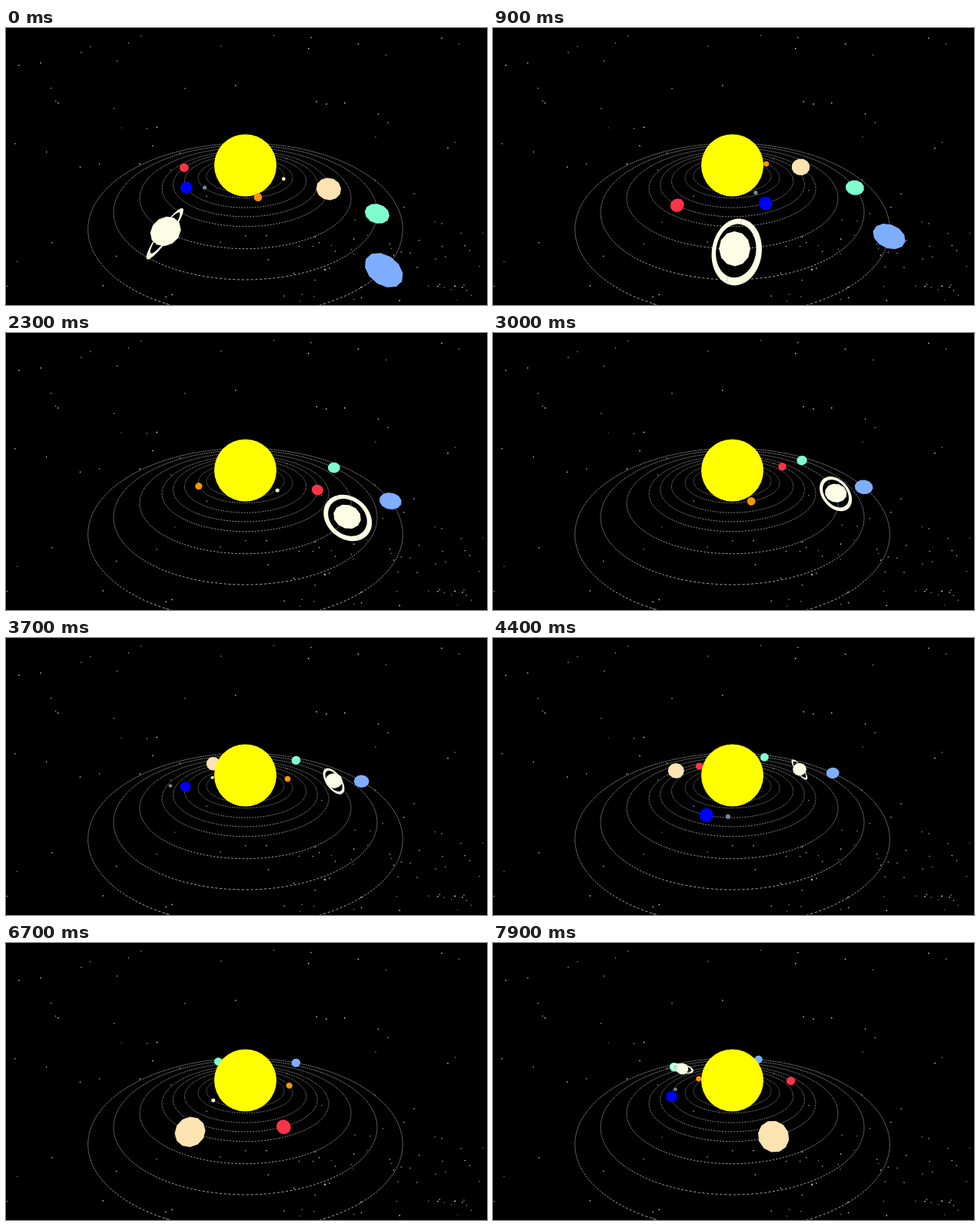
Animation, 626 px wide and 361 px high, one loop 8 s. Source, as an HTML page with a canvas:

```html
<!DOCTYPE html>
<html lang="en">
<head>
<meta charset="utf-8">
<title>Planets</title>
<style>
html, body { margin: 0; width: 100%; height: 100%; overflow: hidden; background: #000; }
canvas { display: block; width: 626px; height: 361px; }
</style>
</head>
<body>
<canvas id="stage" width="626" height="361"></canvas>
<script>
const W = 626, H = 361, LOOP = 8000, STEP = 100, TAU = Math.PI * 2;
const ctx = document.getElementById('stage').getContext('2d');
const rad = deg => deg * Math.PI / 180;

// Camera: focal length, ground scale, pitch terms, screen centre, eye position
const FOCAL = 217.6, SCALE = 235, PITCH = 88.8, DROP = 8.2, TILT = 0.408;
const CX = 311.5, CY = 180.5;
const EYE = [0, 0.382, 0.844];

// Scene axes: x right, y up, z towards the viewer
function project([x, y, z]) {
  const depth = 1 - z - y * TILT;
  return {
    x: CX + SCALE * x / depth,
    y: CY + (PITCH * z + DROP - FOCAL * y) / depth,
    depth
  };
}

const onGround = (r, deg) => [r * Math.cos(rad(deg)), 0, r * Math.sin(rad(deg))];
const add = (a, b) => a.map((v, i) => v + b[i]);
const mul = (a, k) => a.map(v => v * k);
const dot = (a, b) => a[0] * b[0] + a[1] * b[1] + a[2] * b[2];
const unit = a => mul(a, 1 / Math.hypot(...a));
const cross = (a, b) => [
  a[1] * b[2] - a[2] * b[1],
  a[2] * b[0] - a[0] * b[2],
  a[0] * b[1] - a[1] * b[0]
];

// size is in px at unit depth, start in degrees, speed in degrees per second
const planets = {
  mercury: { orbit: 0.210, size: 2.1, start: 21, speed: 143.3, color: '#fffac8' },
  venus:   { orbit: 0.253, size: 4.0, start: 78, speed: 119.6, color: '#ff9500' },
  earth:   { orbit: 0.319, size: 6.1, start: 148.6, speed: 89.6, color: '#0000ff' },
  mars:    { orbit: 0.371, size: 5.9, start: 191.3, speed: 71.8, color: '#ff3348' },
  jupiter: { orbit: 0.419, size: 11.7, start: 25.2, speed: 39.8, color: '#fbe3b2' },
  saturn:  { orbit: 0.505, size: 9.9, start: 119.3, speed: 32.5, color: '#fdfde6' },
  uranus:  { orbit: 0.5895, size: 8.0, start: 37, speed: 22.3, color: '#7fffd0' },
  neptune: { orbit: 0.657, size: 8.2, start: 59.6, speed: 16.3, color: '#7faeff' }
};
const MOON = { orbit: 0.0845, size: 2.1, speed: 1288, color: '#7a8794' };
const RING = { outer: 0.082, inner: 0.066, lead: 54, lean: 45 };
const SUN = { x: 311.5, y: 179, r: 40.5, depth: 0.785, color: '#ffff00' };

// The motion runs a touch ahead in mid-loop
const clockAt = t => t + 0.068 * Math.sin(Math.PI * t / 7.9);

function seeded(seed) {
  return () => (seed = seed * 16807 % 2147483647) / 2147483647;
}

function drawStars(g) {
  const rnd = seeded(4711);
  const star = (x, y) => {
    const s = 1 + rnd() * 0.6, v = 130 + rnd() * 110;
    g.fillStyle = `rgb(${v},${v},${v})`;
    g.fillRect(x, y, s, s);
  };
  const bright = [[159, 19], [16, 48], [67, 97], [140, 104], [348, 9], [393, 26],
    [440, 97], [298, 74], [11, 150], [52, 161], [59, 279], [311, 270]];
  bright.forEach(([x, y]) => star(x, y));
  for (let i = 0; i < 55; i++) star(rnd() * W, rnd() * H);
  // denser towards the lower right
  for (let i = 0; i < 50; i++) star(200 + 420 * Math.sqrt(rnd()), 225 + 130 * Math.sqrt(rnd()));
}

function drawOrbit(g, orbit) {
  const count = Math.round(TAU * orbit * SCALE / 2.4);
  g.beginPath();
  for (let i = 0; i < count; i++) {
    const a = project(onGround(orbit, 360 * i / count));
    const b = project(onGround(orbit, 360 * (i + 0.55) / count));
    g.moveTo(a.x, a.y);
    g.lineTo(b.x, b.y);
  }
  g.stroke();
}

function makeBackdrop() {
  const layer = document.createElement('canvas');
  layer.width = W;
  layer.height = H;
  const g = layer.getContext('2d');
  g.fillStyle = '#000';
  g.fillRect(0, 0, W, H);
  drawStars(g);
  g.lineWidth = 1;
  for (const { orbit } of Object.values(planets)) {
    const v = 100 + 100 * orbit;
    g.strokeStyle = `rgb(${v},${v},${v})`;
    drawOrbit(g, orbit);
  }
  return layer;
}
const backdrop = makeBackdrop();

// Spheres stretch away from the centre of view
function drawBall(pos, { size, color }, spin) {
  const p = project(pos);
  const dx = p.x - CX, dy = p.y - CY, r = size * 1.02 / p.depth;
  const sides = 12, turn = Math.atan2(dy, dx);
  ctx.save();
  ctx.translate(p.x, p.y);
  ctx.rotate(turn);
  ctx.scale(Math.hypot(dx, dy, FOCAL) / FOCAL, 1);
  ctx.beginPath();
  for (let i = 0; i < sides; i++) {
    const a = TAU * i / sides + rad(spin) - turn;
    ctx.lineTo(r * Math.cos(a), r * Math.sin(a));
  }
  ctx.fillStyle = color;
  ctx.fill();
  ctx.restore();
}

function drawHalfRing(pos, u, v, color) {
  const n = 32;
  const lineAt = (r, i) => {
    const a = Math.PI * i / n;
    const p = project(add(pos, add(mul(u, r * Math.cos(a)), mul(v, r * Math.sin(a)))));
    ctx.lineTo(p.x, p.y);
  };
  ctx.beginPath();
  for (let i = 0; i <= n; i++) lineAt(RING.outer, i);
  for (let i = n; i >= 0; i--) lineAt(RING.inner, i);
  ctx.fillStyle = color;
  ctx.fill();
}

// The ring leans at a fixed angle and turns with the orbit
function drawSaturn(pos, planet, angle) {
  const az = rad(angle + RING.lead), lean = rad(RING.lean);
  const normal = [Math.sin(lean) * Math.cos(az), Math.cos(lean), Math.sin(lean) * Math.sin(az)];
  const view = add(EYE, mul(pos, -1));
  const u = unit(cross(normal, view));
  let front = cross(normal, u);
  if (dot(front, view) < 0) front = mul(front, -1);
  drawHalfRing(pos, u, mul(front, -1), planet.color);
  drawBall(pos, planet, angle);
  drawHalfRing(pos, u, front, planet.color);
}

function drawSun() {
  ctx.beginPath();
  ctx.arc(SUN.x, SUN.y, SUN.r, 0, TAU);
  ctx.fillStyle = SUN.color;
  ctx.fill();
}

function draw(t) {
  const clock = clockAt(t);
  const items = [{ depth: SUN.depth, paint: drawSun }];
  const place = (pos, paint) => items.push({ depth: 1 - pos[2], paint });

  for (const [name, planet] of Object.entries(planets)) {
    const angle = planet.start - planet.speed * clock;
    const pos = onGround(planet.orbit, angle);
    const paint = name === 'saturn' ? drawSaturn : drawBall;
    place(pos, () => paint(pos, planet, angle));
    if (name === 'earth') {
      const moon = add(pos, onGround(MOON.orbit, -MOON.speed * clock));
      place(moon, () => drawBall(moon, MOON, 0));
    }
  }
  ctx.drawImage(backdrop, 0, 0);
  items.sort((a, b) => b.depth - a.depth).forEach(item => item.paint());
}

function tick() {
  const ms = performance.now() % LOOP;
  draw(Math.floor(ms / STEP) * STEP / 1000);
  requestAnimationFrame(tick);
}
tick();
</script>
</body>
</html>
```
